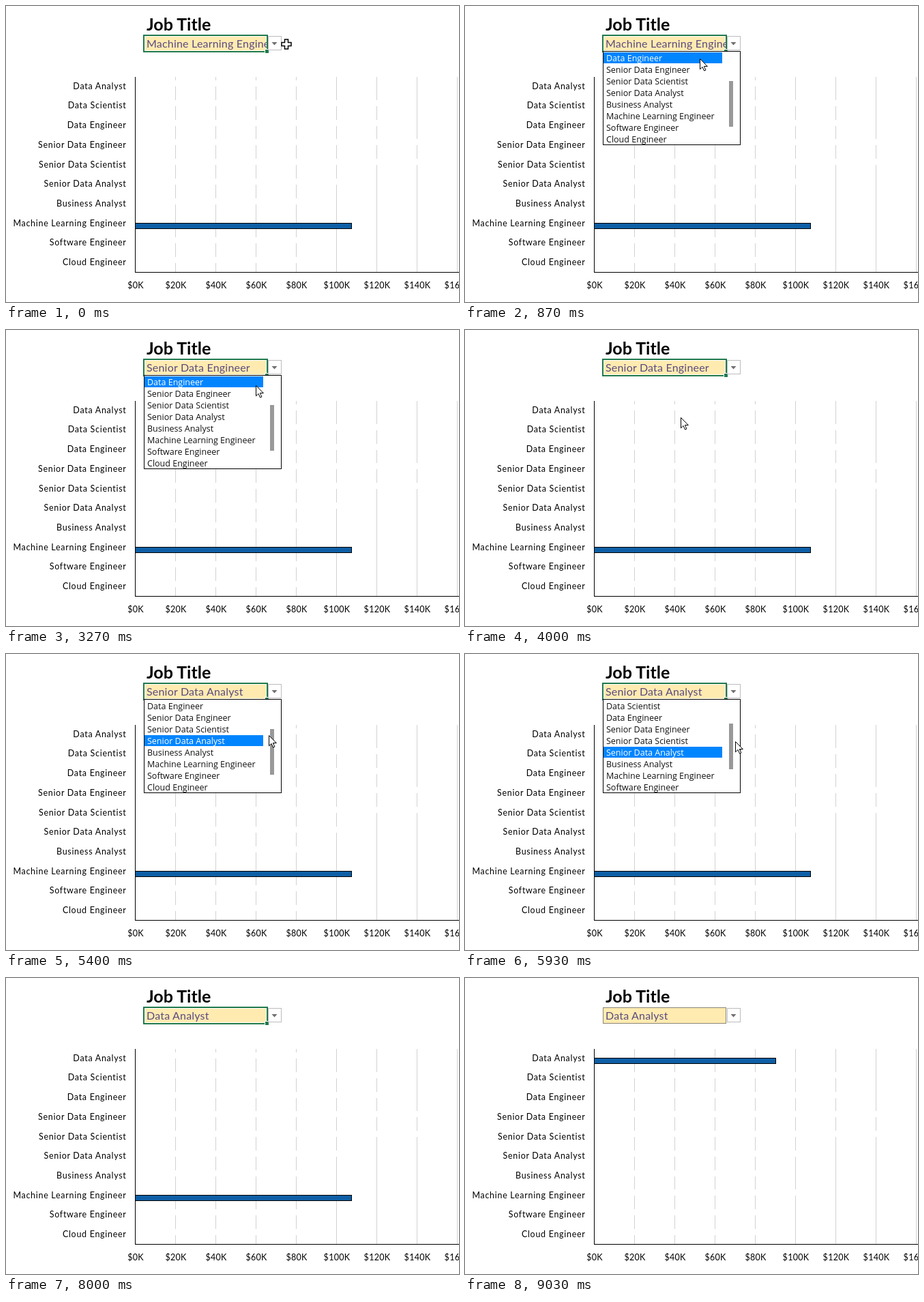
Recreate the animation shown at these times as an HTML page. Size 664 by 434 pixels, loop 9060 ms.

```html
<!DOCTYPE html>
<html lang="en">
<head>
<meta charset="utf-8">
<title>Job title chart</title>
<style>
  html, body { margin: 0; width: 100%; height: 100%; overflow: hidden; background: #fff; }
  svg { display: block; width: 664px; height: 434px; }
  rect, line { shape-rendering: crispEdges; }
  text { white-space: pre; }
  .label { font: 12.5px Lato, sans-serif; letter-spacing: .7px; text-anchor: end; }
  .tick { font: 12.5px Lato, sans-serif; letter-spacing: .3px; text-anchor: middle; }
  .title { font: bold 25px Lato, sans-serif; }
  .value { font: 16px Lato, sans-serif; letter-spacing: .2px; fill: #5b4a80; }
  .item { font: 12.5px "Open Sans", sans-serif; fill: #111; }
  .item.on { fill: #fff; }
  .grid { stroke: #d2d2d2; }
  .axis { stroke: #000; }
  .bar { fill: #0f5fa6; stroke: #000; }
</style>
</head>
<body>
<svg viewBox="0 0 664 434">
  <defs><clipPath id="cellClip"><rect x="203" y="44" width="179" height="22"/></clipPath></defs>
  <g id="chart"></g>
  <text class="title" x="206" y="36">Job Title</text>

  <rect x="202" y="43" width="181" height="24" fill="#ffebb0"/>
  <rect id="inset" x="203.5" y="44.5" width="178" height="21" fill="none" stroke="#fff"/>
  <text id="value" class="value" x="206" y="61" clip-path="url(#cellClip)"></text>
  <rect id="plain" x="202.5" y="43.5" width="180" height="23" fill="none" stroke="#8a8578"/>
  <g id="selected">
    <rect x="202" y="43" width="181" height="24" fill="none" stroke="#217a4b" stroke-width="2"/>
    <rect x="379" y="63" width="6" height="6" fill="#fff"/>
    <rect x="380" y="64" width="5" height="5" fill="#217a4b"/>
  </g>
  <rect x="384.5" y="44.5" width="19" height="20" fill="#fff" stroke="#bcbcc0"/>
  <path d="M389.5 53h8l-4 4.5z" fill="#707070"/>

  <g id="list">
    <rect x="202.5" y="66.5" width="201" height="137" fill="#fff" stroke="#000"/>
    <rect id="hover" x="203" width="174" height="16" fill="#0085ff"/>
    <g id="items"></g>
    <rect id="thumb" x="387" width="6" height="67" fill="#999"/>
  </g>

  <path id="cross" d="M-2.5-7h5v4.5h4.5v5h-4.5v4.5h-5v-4.5h-4.5v-5h4.5z" fill="#fff" stroke="#000" stroke-width="1.5"/>
  <path id="arrow" d="M.5.5v15.3l3.5-3.4 2.6 5.6 2.3-1-2.5-5.5h4.9z" fill="#fff" stroke="#000"/>
</svg>
<script>
const LOOP = 9060;
const jobs = ["Data Analyst", "Data Scientist", "Data Engineer", "Senior Data Engineer",
  "Senior Data Scientist", "Senior Data Analyst", "Business Analyst",
  "Machine Learning Engineer", "Software Engineer", "Cloud Engineer"];
const salary = [90.2, 127, 125, 147, 155, 111, 85, 107.5, 99, 90];
const FIRST_JOB = 7, LAST_JOB = 0;
const X0 = 189.5, PX_PER_K = 2.95, TOP = 104, ROW = 28.7;
const ROWS = 8, ITEM_TOP = 68, ITEM_H = 17;

// The list opens, closes on a click, and the cell follows shortly after
const COMMIT = 70;
const picks = [
  { open: 330, close: 1330, job: 3 },
  { open: 2930, close: 4000, job: 5 },
  { open: 5200, close: 7300, job: LAST_JOB }
];

const home = [411, 56], button = [390, 58];
const item = (row, x) => [x, ITEM_TOP + ITEM_H * row + 9];
const drag = { from: 5750, to: 6080 };
const moves = [
  { from: 60, to: 260, at: button },
  { from: 400, to: 870, at: item(0, 344) },
  { from: 1000, to: 1150, at: item(1, 331) },
  { from: 2000, to: 2370, at: button },
  { from: 2930, to: 3830, at: item(3, 316) },
  { from: 4100, to: 4700, at: button },
  { from: 5200, to: 5400, at: [385, 119] },
  { from: 5400, to: 5650, at: [396, 138] },
  { ...drag, at: [396, 121] },
  { from: 6080, to: 6500, at: item(0, 318) },
  { from: 6500, to: 6600, at: item(0, 335) }
];

const $ = id => document.getElementById(id);
function set(el, attrs) {
  for (const k in attrs) el.setAttribute(k, attrs[k]);
}
function add(parent, tag, attrs, text = "") {
  const el = document.createElementNS("http://www.w3.org/2000/svg", tag);
  set(el, attrs);
  el.textContent = text;
  return parent.appendChild(el);
}
const show = (el, on) => { el.style.display = on ? "" : "none"; };
function progress(t, { from, to }) {
  const p = Math.min(1, Math.max(0, (t - from) / (to - from)));
  return p * p * (3 - 2 * p);
}

const pointerAt = t => moves.reduce((pos, move) => {
  const p = progress(t, move);
  return pos.map((v, i) => v + (move.at[i] - v) * p);
}, home);

const jobAt = t => picks.reduce((job, p) => t >= p.close + COMMIT ? p.job : job, FIRST_JOB);

const chart = $("chart");
for (let i = 0; i <= 8; i++) {
  const x = X0 + 20 * PX_PER_K * i;
  if (i) add(chart, "line", { class: "grid", x1: x, x2: x, y1: TOP, y2: 390 });
  add(chart, "text", { class: "tick", x: x + .5, y: 414 }, `$${20 * i}K`);
}
const bars = jobs.map((job, i) => {
  const mid = TOP + ROW * (i + .5);
  add(chart, "text", { class: "label", x: 176.5, y: Math.round(mid + 3.4) }, job);
  return {
    blank: add(chart, "rect", { x: X0, y: Math.round(mid - 9), height: 9, fill: "#fff" }),
    fill: add(chart, "rect", { class: "bar", x: X0, y: Math.round(mid - 1) + .5, height: 8 })
  };
});
add(chart, "line", { class: "axis", x1: X0, x2: X0, y1: TOP, y2: 391 });
add(chart, "line", { class: "axis", x1: 189, x2: 664, y1: 390.5, y2: 390.5 });

const items = Array.from({ length: ROWS }, (_, i) =>
  add($("items"), "text", { x: 207, y: ITEM_TOP + ITEM_H * i + 13 }));

// The filled bar of the chosen job takes over from its blank one
function drawBars(t) {
  const p = progress(t, { from: 8000, to: 8430 });
  bars.forEach(({ blank, fill }, i) => {
    const share = i === FIRST_JOB ? 1 - p : i === LAST_JOB ? p : 0;
    const full = salary[i] * PX_PER_K;
    set(blank, { width: full * (1 - share) });
    set(fill, { width: full * share });
    show(fill, share > 0);
  });
}

function drawList(t, job, [x, y]) {
  const open = picks.some(p => t >= p.open && t < p.close);
  show($("list"), open);
  if (!open) return;
  const first = Math.round(2 * (1 - progress(t, drag)));
  const inside = x > 203 && x < 377 && y >= ITEM_TOP && y < ITEM_TOP + ROWS * ITEM_H;
  const row = inside ? Math.floor((y - ITEM_TOP) / ITEM_H) : job - first;
  items.forEach((el, i) => {
    el.textContent = jobs[first + i];
    set(el, { class: i === row ? "item on" : "item" });
  });
  set($("hover"), { y: ITEM_TOP + ITEM_H * row });
  set($("thumb"), { y: Math.round(93 + ITEM_H / 2 * first) });
}

function draw(t) {
  const job = jobAt(t), pos = pointerAt(t);
  const active = t < 9000, isCross = t < 150;
  $("value").textContent = jobs[job];
  show($("selected"), active);
  show($("inset"), active);
  show($("plain"), !active);
  drawBars(t);
  drawList(t, job, pos);
  for (const id of ["cross", "arrow"]) set($(id), { transform: `translate(${pos.map(Math.round)})` });
  show($("cross"), isCross);
  show($("arrow"), !isCross && t < 7400);
}

const start = performance.now();
function tick() {
  draw((performance.now() - start) % LOOP);
  requestAnimationFrame(tick);
}
tick();
</script>
</body>
</html>
```
